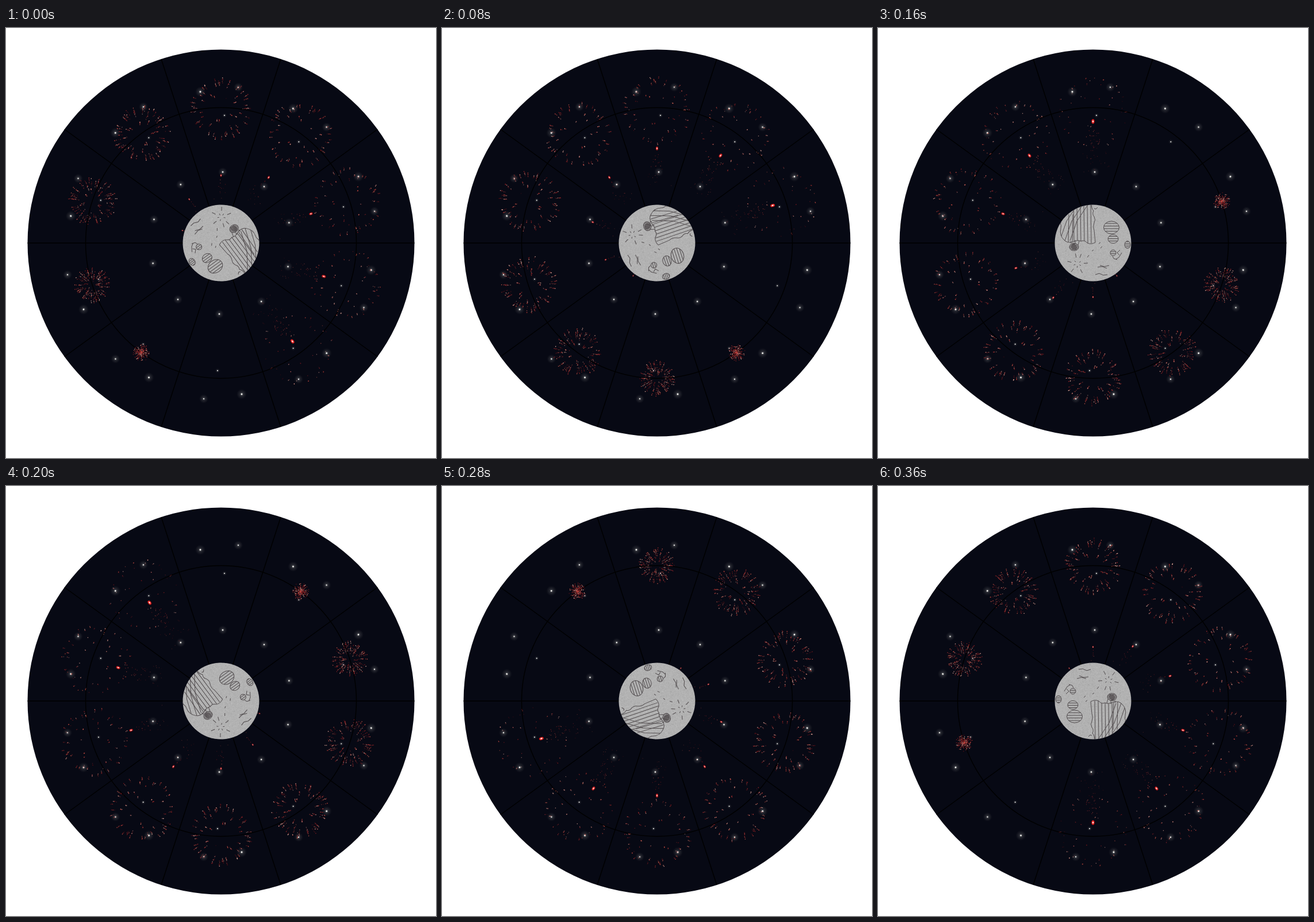
An HTML page with a canvas that plays this animation: 748x748 px, repeating every 0.4 s.

```html
<!DOCTYPE html>
<html>
<head>
<meta charset="utf-8">
<style>
html, body { margin: 0; width: 100%; height: 100%; overflow: hidden; background: #fff; }
canvas { display: block; }
</style>
</head>
<body>
<canvas id="stage" width="748" height="748"></canvas>
<script>
const ctx = document.getElementById('stage').getContext('2d');
const TAU = Math.PI * 2, STEP = TAU / 10;
const DISC = 336.5, RING = 235.5, MOON = 66.5;

function seeded(seed) {
  return () => {
    seed = (seed + 0x6D2B79F5) | 0;
    let x = Math.imul(seed ^ (seed >>> 15), 1 | seed);
    x ^= x + Math.imul(x ^ (x >>> 7), 61 | x);
    return ((x ^ (x >>> 14)) >>> 0) / 4294967296;
  };
}

function turned(angle, draw) {
  ctx.save();
  ctx.rotate(angle);
  draw();
  ctx.restore();
}

function ellipse(x, y, rx, ry, angle = 0) {
  ctx.beginPath();
  ctx.ellipse(x, y, rx, ry, angle, 0, TAU);
}

function line(...points) {
  ctx.beginPath();
  for (let i = 0; i < points.length; i += 2) ctx.lineTo(points[i], points[i + 1]);
  ctx.stroke();
}

function dot(x, y, size, color, alpha) {
  ctx.globalAlpha = alpha;
  ctx.fillStyle = color;
  ctx.fillRect(x - size / 2, y - size / 2, size, size);
}

// Burst particles: an outer shell and looser inner ones
const rnd = seeded(7);
const particles = Array.from({ length: 54 }, (_, i) => ({
  angle: i * 2.39996 + (rnd() - 0.5) * 0.2,
  reach: i < 26 ? 0.9 + rnd() * 0.1 : 0.4 + rnd() * 0.5
}));
const SPARKS = ['#5f1218', '#8a2023', '#b03032', '#d8604f', '#f8b8a8'];

function drawBurst(stage) {
  const rand = seeded(100 + stage);
  const late = Math.max(0, stage - 4) / 4;
  const drop = 0.13 * stage * stage;
  for (const p of particles) {
    for (let j = 0; j < 7; j++) {
      const keep = rand(), tone = rand(), jx = rand() - 0.5, jy = rand() - 0.5;
      if (keep > 0.72 - 0.5 * late) continue;
      const age = Math.max(-0.55, stage - j * (0.13 + 0.03 * stage));
      const r = 64 * p.reach * (1 - Math.exp(-0.42 * (age + 0.6)));
      dot(Math.sin(p.angle) * r + jx * 1.2,
          -RING + drop - Math.cos(p.angle) * r + jy * 1.2,
          1.3, SPARKS[Math.floor(tone * 5)], (1 - 0.08 * j) * (0.92 - 0.25 * late));
    }
  }
  ctx.globalAlpha = 1;
}

function drawRocket(stage) {
  const rand = seeded(300 + stage), r = 23.5 * (stage + 1), k = stage / 8;
  for (let i = 0; i < 46 * k * k; i++) {
    const u = rand(), side = rand() + rand() - 1;
    dot(side * (10 + 30 * u) * k, -r + (14 + 74 * u) * k, 1.1,
        SPARKS[Math.floor(rand() * 4)], 0.7 - 0.45 * u);
  }
  ctx.globalAlpha = 0.45 + 0.55 * k;
  ctx.fillStyle = '#e3201f';
  ellipse(0, -r, 0.6 + 2 * k, 0.7 + 3.3 * k);
  ctx.fill();
  ctx.fillStyle = '#fff0ea';
  ellipse(0, -r, 0.4 + 0.7 * k, 0.4 + 1.4 * k);
  ctx.fill();
  ctx.globalAlpha = 1;
}

function drawStar(x, y, core, glow) {
  const g = ctx.createRadialGradient(x, y, 0, x, y, glow);
  g.addColorStop(0, 'rgba(190,190,190,.55)');
  g.addColorStop(0.4, 'rgba(130,130,130,.22)');
  g.addColorStop(1, 'rgba(100,100,100,0)');
  ctx.fillStyle = g;
  ellipse(x, y, glow, glow);
  ctx.fill();
  ctx.fillStyle = '#f4f4f0';
  ellipse(x, y, core, core);
  ctx.fill();
}

function drawSector() {
  drawStar(-36, -263, 1.4, 9);
  drawStar(30, -271, 1.1, 8);
  drawStar(6, -222, 0.9, 4);
  drawStar(3, -123.5, 1.2, 8);
}

function hatched(x, y, rx, ry, gap, angle = 0) {
  ctx.save();
  ctx.translate(x, y);
  ctx.rotate(angle);
  ellipse(0, 0, rx, ry);
  ctx.stroke();
  ctx.clip();
  for (let h = -ry + gap; h < ry; h += gap) line(-rx, h, rx, h);
  ctx.restore();
}

function drawMoon() {
  ctx.fillStyle = '#b2b2b2';
  ellipse(0, 0, MOON, MOON);
  ctx.fill();
  ctx.save();
  ctx.clip();

  const rand = seeded(21);
  for (let i = 0; i < 6000; i++) {
    dot((rand() - 0.5) * 134, (rand() - 0.5) * 134, 1.2, rand() < 0.5 ? '#888' : '#dadada', 0.16);
  }
  ctx.globalAlpha = 1;
  ctx.strokeStyle = '#514c4e';
  ctx.lineWidth = 1;

  // Large hatched sea
  const sea = new Path2D('M-4 1 Q3-3 10 0 Q15 6 21 3 Q27 6 34 2 Q46-1 51 6 Q59 14 56 25 Q54 31 58 36 L62 70 L2 70 Q4 61-1 56 Q2 50-2 46 Q-5 40-2 35 Q1 28-2 22 Z');
  ctx.stroke(sea);
  ctx.save();
  ctx.clip(sea);
  for (let x = 3; x < 34; x += 6) line(x, 0, x + 1, 68);
  for (let x = 40; x < 76; x += 9) line(x, 4, x - 12, 38, x - 32, 68);
  for (let x = 36; x < 50; x += 7) line(x, 2, x - 1, 50);
  ctx.restore();

  // Dark crater above it
  hatched(33, -7, 8, 6.5, 2);
  hatched(33, -7, 5, 4, 1.6, 1);
  line(26, -4, 24, 4);
  line(31, 0, 31, 5);
  line(38, -1, 39, 3);

  // Rayed crater
  for (let i = 0; i < 11; i++) {
    const a = i * TAU / 11 + 0.2, s = Math.sin(a), c = Math.cos(a);
    const near = i % 2 ? 4 : 11, far = i % 2 ? 7 : 18;
    line(27 + s * near, -36 + c * near, 27 + s * far, -36 + c * far);
  }

  // Ridges
  line(-25, -55, -18, -56, -11, -53, -4, -55);
  line(-24, -44, -16, -41, -8, -42);
  line(-28, -39, -20, -41, -12, -39);
  line(-16, -6, -13, -9);
  line(-13, 1, -10, -1);
  line(7, -21, 10, -25);
  line(-1, -12, 2, -14);
  line(-8, 62, -5, 59, -2, 60);

  // Small craters
  hatched(-35, 7, 9, 7.5, 4);
  hatched(-32, 27, 13.5, 11, 4.5);
  hatched(-60, -3, 5, 6.5, 3);
  hatched(-35, -17, 5, 5, 3.5);
  line(-50, -17, -45, -25, -40, -28);
  line(-47, -12, -42, -17, -46, -21);
  line(-42, -29, -36, -27, -34, -23);
  ctx.restore();
}

function drawWheel(n) {
  ctx.setTransform(1, 0, 0, 1, 0, 0);
  ctx.fillStyle = '#fff';
  ctx.fillRect(0, 0, 748, 748);
  ctx.translate(374, 374);

  ctx.fillStyle = '#070914';
  ctx.strokeStyle = '#000';
  ctx.lineWidth = 1.4;
  ellipse(0, 0, DISC, DISC);
  ctx.fill();
  ellipse(0, 0, RING, RING);
  ctx.stroke();

  for (let k = 0; k < 10; k++) {
    turned((k + 0.5) * STEP, () => line(0, 0, 0, -DISC));
  }
  for (let k = 0; k < 10; k++) {
    turned((6 + k - n) * STEP, () => {
      drawSector();
      if (k < 9) {
        drawBurst(k);
        drawRocket(k);
      }
    });
  }
  turned(-(n + 1) * STEP, drawMoon);
}

let shown = -1;
function tick() {
  const n = Math.floor(performance.now() / 40) % 10;
  if (n !== shown) drawWheel(shown = n);
  requestAnimationFrame(tick);
}
tick();
</script>
</body>
</html>
```
